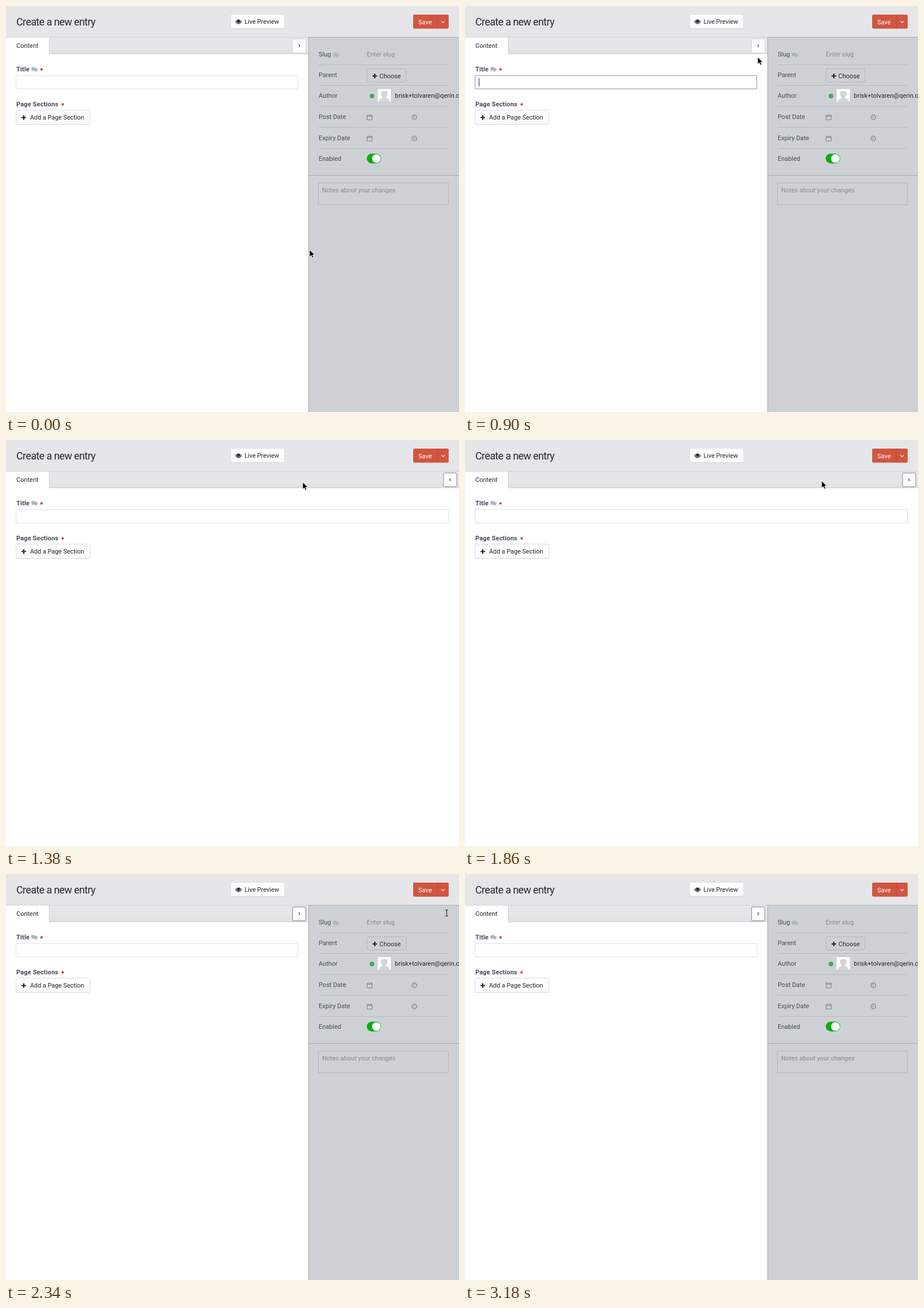
Recreate the animation shown at these times as an HTML page. Size 791 px wide and 708 px high, loop 3240 ms.

```html
<!DOCTYPE html>
<html lang="en">
<head>
<meta charset="utf-8">
<title>Create a new entry</title>
<style>
  html, body { margin: 0; width: 100%; height: 100%; overflow: hidden; background: #fff; }
  svg { display: block; font: 11px Roboto, Inter, sans-serif; }
  text { fill: #24282e; white-space: pre; }
  .label { fill: #454c56; }
  .bold { fill: #454c56; font-weight: 700; letter-spacing: .18px; }
  .hint { fill: #868b91; }
  .line { fill: none; stroke: #b7bbc0; }
  .icon { fill: none; stroke: #7d8288; }
  .btn { fill: url(#face); stroke: #dcdde1; }
  .chevron { fill: none; stroke: #33383f; stroke-width: 1.1; }
  .red { fill: #d4503c; }
</style>
</head>
<body>
<svg width="791" height="708" viewBox="0 0 791 708">
  <defs>
    <linearGradient id="face" x2="0" y2="1">
      <stop stop-color="#fff"/><stop offset="1" stop-color="#f9fafb"/>
    </linearGradient>
    <linearGradient id="bar" x2="0" y2="1">
      <stop offset=".6" stop-color="#e6e6e9"/><stop offset="1" stop-color="#e0e0e3"/>
    </linearGradient>
    <path id="plus" d="M-4 0H4M0-4V4" stroke="#24282e" stroke-width="2.2"/>
    <g id="chat" fill="#adb6c0">
      <path d="M5 3a3.6 2.8 0 1 1 3 4.6l2 1.8-3.6-1.2z"/>
      <ellipse cx="4" cy="3.3" rx="4" ry="3.1"/>
      <path d="M1.6 5 .6 8 4.4 6z"/>
    </g>
    <g id="calendar" class="icon">
      <path d="M.5 1.5h9v8h-9zM.5 3.5h9M2.5 0v2M7.5 0v2"/>
    </g>
    <g id="clock" class="icon">
      <circle r="4.1" stroke-width="1.2"/><path d="M0-2.5V.5H-2"/>
    </g>
  </defs>

  <rect width="791" height="708" fill="#fff"/>
  <rect width="791" height="54" fill="#e6e6e9"/>
  <rect y="54" width="791" height="30" fill="url(#bar)"/>
  <path d="M0 54.5H791M75.5 55V84M76 83.5H791" stroke="#d0d1d5"/>
  <rect y="55" width="75" height="30" fill="#fff"/>

  <text x="18" y="34" font-size="18" letter-spacing="-.6">Create a new entry</text>
  <text x="18" y="73">Content</text>

  <rect class="btn" x="392.5" y="14.5" width="94" height="25" rx="2"/>
  <path d="M393 39.5H487" stroke="#d0d1d5"/>
  <path d="M401 27.5Q406 20.5 411 27.5Q406 34.5 401 27.5Z" fill="#fff" stroke="#24282e" stroke-width="1.2"/>
  <circle cx="406" cy="27" r="2.7" fill="#24282e"/>
  <text x="416.5" y="31" letter-spacing="-.06">Live Preview</text>

  <path d="M713 15H753V39.500H713q-2 0-2-2V17q0-2 2-2zM754 15H771q2 0 2 2V37.500q0 2-2 2H754z" fill="#d15641"/>
  <path d="M753.500 15V39.500" stroke="#b94a38"/>
  <text x="720" y="32" style="fill:#fff">Save</text>
  <path d="M760.500 26.500l2.800 2.800 2.800-2.800" fill="none" stroke="#fff" stroke-width="1.1"/>

  <text class="bold" x="18" y="114">Title</text>
  <use href="#chat" x="44" y="106"/>
  <circle class="red" cx="62" cy="110.500" r="2.2"/>
  <rect id="field" x="17.500" y="121.500" height="23" fill="#fff"/>
  <path id="caret" d="M24.500 126V140" stroke="#24282e"/>
  <text class="bold" x="18" y="174.500">Page Sections</text>
  <circle class="red" cx="99" cy="171.500" r="2.2"/>
  <rect class="btn" x="17.500" y="181.500" width="129" height="25" rx="2"/>
  <path d="M18 206.500H146" stroke="#d5d6da"/>
  <use href="#plus" x="31" y="194.500"/>
  <text x="42" y="198" letter-spacing="-.06">Add a Page Section</text>

  <g id="panel">
    <rect x="528" y="54" width="263" height="654" fill="#cdd1d5"/>
    <path d="M528.500 54V708M528 54.500H791M528 295.500H791" stroke="#a9adb2"/>
    <path class="line" d="M546 102.500H773M546 138.500H773M546 175.500H773M546 211.500H773M546 248.500H773"/>
    <g id="labels"></g>
    <use href="#chat" x="570.500" y="81"/>
    <text class="hint" x="630" y="88">Enter slug</text>
    <rect x="630.500" y="109.500" width="68" height="23" rx="2" fill="none" stroke="#9b9fa5" stroke-dasharray="2 2"/>
    <use href="#plus" x="644" y="122"/>
    <text x="652" y="126">Choose</text>
    <circle cx="639" cy="157" r="4" fill="#3dab5f"/>
    <rect x="649" y="145" width="23" height="22" fill="#fff"/>
    <path d="M651 167q0-5 6-6.500v-2q-2.500-2-2.500-5.500 0-5 6-5t6 5q0 3.500-2.500 5.500v2q6 1.500 6 6.500z" fill="#d3d6d9"/>
    <text x="679" y="160">brisk+tolvaren@qerin.com</text>
    <use href="#calendar" x="630" y="189"/>
    <use href="#calendar" x="630" y="226"/>
    <use href="#clock" x="713" y="194"/>
    <use href="#clock" x="713" y="231"/>
    <rect x="630" y="257.500" width="25" height="17" rx="8.500" fill="#08b00e"/>
    <circle cx="646.700" cy="266" r="7.600" fill="#fff"/>
    <rect x="545.500" y="308.500" width="227" height="38" fill="none" stroke="#b3b7bc"/>
    <text class="hint" x="552" y="324.500">Notes about your changes</text>
  </g>

  <g id="toggle">
    <rect x="500.500" y="57.500" width="23" height="24" rx="1.500"/>
    <path class="chevron"/>
  </g>

  <g id="pointer">
    <path id="arrow" d="M0 0V12.500L2.900 9.900 4.900 14.300 7.100 13.300 5.200 9.100H9.200Z" fill="#000" stroke="#fff" stroke-width=".9"/>
    <path id="hand" d="M-.8 8V.8Q-.8-.7.500-.7T1.800.8V4.800Q3.600 3.800 4.300 5.200 6 4.500 6.600 5.900 8.300 5.500 8.300 7.300V9.500Q8.300 11 7.200 12.800V13.500H.500V12.700L-3 8.300Q-4-.300-.8 8Z" fill="#fff" stroke="#000"/>
    <path id="beam" d="M-2-5.500H-1L.5-4.500 2-5.500H3M-2 5.500H-1L.5 4.500 2 5.500H3M.5-4.500V4.500" fill="none" stroke="#24282e" stroke-width="1.1"/>
  </g>
</svg>
<script>
const LOOP = 3240, STEP = 60;
const CLOSE = 1380, OPEN = 2340, SHIFT = 263;
const $ = id => document.getElementById(id);
const show = (id, on) => $(id).style.display = on ? '' : 'none';
const within = (t, from, to) => t >= from && t < to;

const rows = { Slug: 88, Parent: 124, Author: 160, 'Post Date': 197, 'Expiry Date': 234, Enabled: 270 };
$('labels').innerHTML = Object.entries(rows)
  .map(([name, y]) => `<text class="label" x="546" y="${y}">${name}</text>`).join('');

$('hand').setAttribute('d',
  'M-1 8V.5Q-1-.9.300-.9T1.600.500V4.800Q3.500 3.600 4.100 5.100 5.800 4.300 6.300 5.800 8 5.500 8 7.400V9.500Q8 11 7 12.500V13.500H.500V12.500L-3 8.500Q-3.700 7-2.500 6.600-1.700 6.600-1 8Z' +
  'M1.600 8.500V11M3.600 8.500V11M5.500 8.500V11');

// Pointer stops: time, x, y
const path = [
  [0, 530, 425], [300, 530, 422], [900, 511, 89], [1140, 511, 88],
  [1260, 518, 73.500], [1620, 518, 73.500], [2160, 769, 68],
  [2640, 769, 68], [3120, 700, 712], [LOOP, 700, 712]
];

function pointerAt(t) {
  const i = path.findIndex(p => p[0] > t);
  const [t0, x0, y0] = path[i - 1], [t1, x1, y1] = path[i];
  const u = (t - t0) / (t1 - t0), k = u * u * (3 - 2 * u);
  return [x0 + (x1 - x0) * k, y0 + (y1 - y0) * k];
}

function draw(now) {
  const t = Math.floor(now % LOOP / STEP) * STEP;
  const closed = within(t, CLOSE, OPEN);
  const pressed = within(t, CLOSE - 120, CLOSE) || within(t, OPEN - 120, OPEN);
  const typing = within(t, 420, CLOSE - 120);

  show('panel', !closed);
  show('caret', typing && t < 960);
  $('field').setAttribute('width', closed ? 492 + SHIFT : 492);
  $('field').setAttribute('stroke', typing ? '#96999e' : '#dedfe1');

  const [box, chevron] = $('toggle').children;
  $('toggle').setAttribute('transform', `translate(${closed ? SHIFT + .5 : 0})`);
  box.setAttribute('fill', pressed ? '#dcdce0' : '#fdfdfe');
  box.setAttribute('stroke', pressed ? '#cbccd1' : t >= CLOSE ? '#858a93' : '#d8d9dd');
  chevron.setAttribute('d', closed ? 'M513 67l-2 2.300 2 2.300' : 'M511 67l2 2.300-2 2.300');

  const hand = within(t, 1200, CLOSE) || within(t, 2100, OPEN);
  const beam = within(t, OPEN, 2700);
  const [x, y] = pointerAt(t);
  $('pointer').setAttribute('transform', `translate(${x} ${y})`);
  show('hand', hand);
  show('beam', beam);
  show('arrow', !hand && !beam);
}

const start = performance.now();
function tick() {
  draw(performance.now() - start);
  requestAnimationFrame(tick);
}
tick();
</script>
</body>
</html>
```
